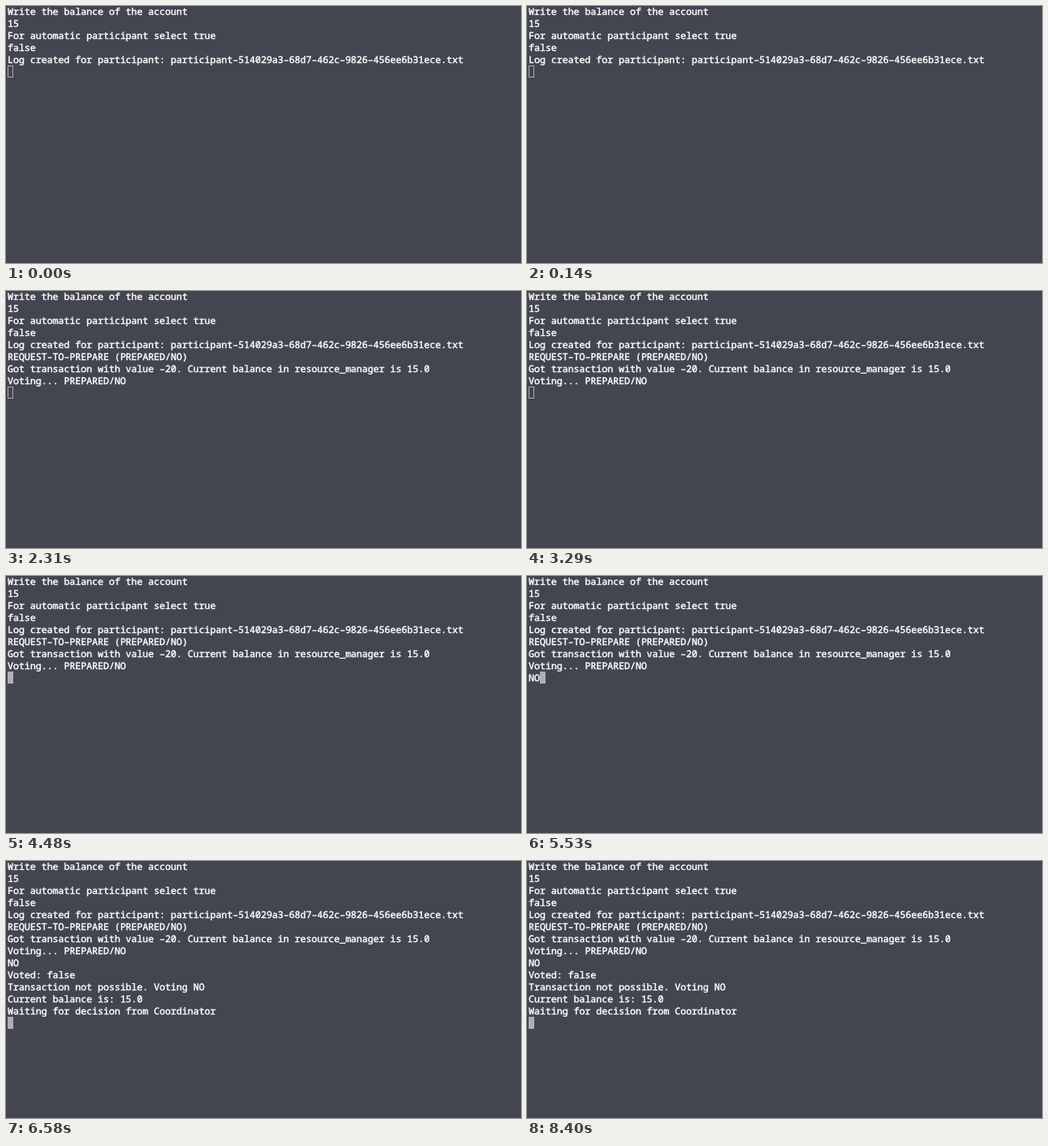
An HTML page for the animation above (8.54 s loop, 640 px wide and 320 px high).

```html
<!DOCTYPE html>
<html lang="en">
<head>
<meta charset="utf-8">
<title>Terminal session</title>
<style>
  html, body { margin: 0; width: 100%; height: 100%; overflow: hidden; background: #434551; }
  svg { display: block; width: 640px; height: 320px; }
  text {
    font: 500 11.667px "Noto Sans Mono", "DejaVu Sans Mono", monospace;
    fill: #fff;
    stroke: #fff;
    stroke-width: 0.45px;
    text-rendering: geometricPrecision;
    white-space: pre;
  }
</style>
</head>
<body>
<svg viewBox="0 0 640 320">
  <g id="screen"></g>
  <rect id="cursor"/>
</svg>
<script>
const LOOP = 8540, CELL = 7, ROW = 15, LEFT = 2;

const intro = [
  "Write the balance of the account",
  "15",
  "For automatic participant select true",
  "false",
  "Log created for participant: participant–514029a3–68d7–462c–9826–456ee6b31ece.txt"
];
const request = [
  "REQUEST–TO–PREPARE (PREPARED/NO)",
  "Got transaction with value –20. Current balance in resource_manager is 15.0",
  "Voting... PREPARED/NO"
];
const result = [
  "NO",
  "Voted: false",
  "Transaction not possible. Voting NO",
  "Current balance is: 15.0",
  "Waiting for decision from Coordinator"
];
const prompt = [...intro, ...request];

// The last line of each step holds the cursor.
const steps = [
  { at: 0, lines: [...intro, ""], focused: false },
  { at: 2310, lines: [...prompt, ""], focused: false },
  { at: 3570, lines: [...prompt, ""], focused: true },
  { at: 4830, lines: [...prompt, "N"], focused: true },
  { at: 5040, lines: [...prompt, "NO"], focused: true },
  { at: 6510, lines: [...prompt, ...result, ""], focused: true }
];

const screen = document.getElementById("screen");
const cursor = document.getElementById("cursor");
let shown = null;

function setAttributes(node, attributes) {
  for (const [key, value] of Object.entries(attributes)) node.setAttribute(key, value);
  return node;
}

function makeLine(content, row) {
  const line = document.createElementNS("http://www.w3.org/2000/svg", "text");
  line.textContent = content;
  return setAttributes(line, { x: LEFT, y: row * ROW + 11 });
}

function show({ lines, focused }) {
  screen.replaceChildren(...lines.map(makeLine));
  const row = lines.length - 1;
  const inset = focused ? 0 : 0.5;
  setAttributes(cursor, {
    x: LEFT + lines[row].length * CELL + inset,
    y: row * ROW - 1 + inset,
    width: CELL - 2 * inset,
    height: ROW - 2 * inset,
    fill: focused ? "#b0b0b1" : "none",
    stroke: focused ? "none" : "#b0b0b1"
  });
}

const start = performance.now();

function tick() {
  const time = (performance.now() - start) % LOOP;
  const step = steps.findLast(s => s.at <= time);
  if (step !== shown) show(shown = step);
  requestAnimationFrame(tick);
}
tick();
</script>
</body>
</html>
```
